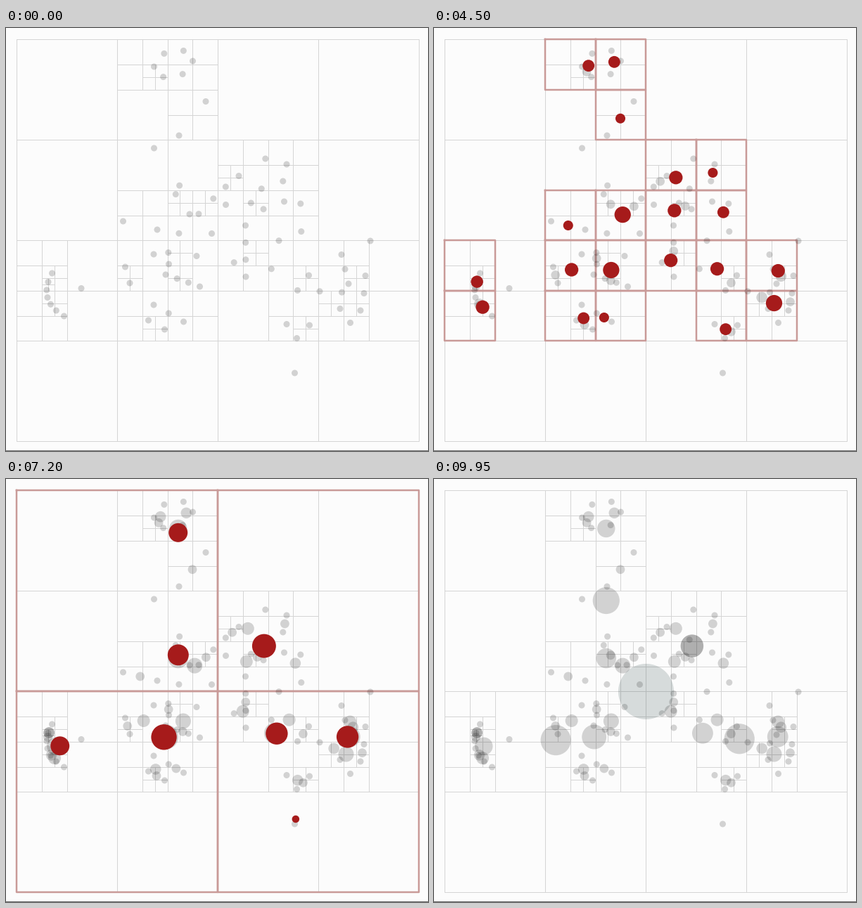
These frames come from a looping animation (600 by 602 pixels, 10000 ms). A matplotlib script:

```python
import math

import matplotlib.pyplot as plt
import numpy as np
from matplotlib.animation import FuncAnimation
from matplotlib.collections import LineCollection

W, H, DPI = 600, 602, 64
STEP, LOOP = 50, 10000
LEFT, TOP, SIZE = 15, 16.4, 572
DOT, RIM = 4.5, 0.75
RED, BOX, GRID, PAPER = "#a61b1b", "#c99a98", "#d5d5d5", "#fcfcfc"
SHADE = 0.165

# One phase per tree level, deepest first (times in ms).
DEEPEST = 5
FIRST, SECOND, PERIOD = 570, 2000, 1559
STARTS = [FIRST] + [SECOND + PERIOD * k for k in range(DEEPEST + 1)]
HOLD, MOVE, GROW = 450, 300, 310


def trail(count, *keys):
    """Dots evenly spaced along the smooth curve through the key points."""
    order = len(keys)
    curve = np.polyfit(np.linspace(0, 1, order), np.array(keys), order - 1)
    return np.vander(np.linspace(0, 1, count), order) @ curve


def ring(count, center, across, down):
    turn = np.linspace(0, 2 * math.pi, count, endpoint=False)[:, None]
    return np.array(center) + np.cos(turn) * across + np.sin(turn) * down


POINTS = np.vstack([
    # top left and centre left
    ring(6, (238, 51), (27.5, -4), (-0.7, 19.2)),
    trail(2, (284, 104.5), (246, 153)),
    trail(4, (210.5, 171), (261.4, 246), (292.5, 292.5)),
    trail(3, (241.3, 236.6), (348.3, 249)),
    trail(3, (261, 265), (230.8, 319.6)),
    trail(2, (166.5, 275), (215, 287)),
    # top right
    trail(3, (368.8, 186), (418.8, 250)),
    trail(3, (331, 210.5), (395.5, 247)),
    trail(3, (312.3, 226), (419.8, 289.6)),
    trail(2, (399, 194), (388, 302.7)),
    trail(4, (340.5, 281), (341, 354)),
    # bottom left
    trail(7, (65.5, 349), (59, 383.5), (82.5, 410)),
    trail(2, (107, 370.5), (176, 363)),
    trail(2, (169.5, 340), (210, 322)),
    trail(2, (231.5, 336), (312.5, 251.5)),
    trail(4, (227, 351), (275.5, 368)),
    trail(3, (210, 394), (252.5, 418)),
    trail(2, (202.5, 416), (225.5, 429)),
    # bottom right
    trail(4, (271, 324.5), (430.5, 352)),
    trail(3, (477, 322.5), (487, 364)),
    trail(3, (518, 303), (504, 402)),
    trail(4, (414.5, 373.4), (509, 377.5)),
    trail(2, (475, 399.5), (489.5, 419.5)),
    trail(2, (399, 421.5), (431.5, 423)),
    trail(2, (413.5, 441.5), (410.5, 491)),
])


def whole(value):
    return math.floor(value + 0.5)


class Cell:
    """Quadtree cell that splits until it holds a single point."""

    def __init__(self, x, y, size, points, depth=0):
        self.x, self.y, self.size, self.depth = x, y, size, depth
        self.center = points.mean(axis=0)
        self.radius = DOT * math.sqrt(len(points))
        self.children = []
        if len(points) < 2:
            return
        half = size / 2
        east = points[:, 0] >= x + half
        south = points[:, 1] >= y + half
        for dx in (0, 1):
            for dy in (0, 1):
                inside = points[(east == dx) & (south == dy)]
                if len(inside):
                    self.children.append(Cell(
                        x + dx * half, y + dy * half, half, inside, depth + 1))

    def inner(self):
        """All cells that were split, this one included."""
        if self.children:
            yield self
            for child in self.children:
                yield from child.inner()

    def ticks(self, shift):
        """Pixel positions of the start, middle and end on both axes."""
        return [[whole(start + self.size * part) + shift for part in (0, 0.5, 1)]
                for start in (self.x, self.y)]

    def outline(self, shift=0.0):
        (x0, _, x1), (y0, _, y1) = self.ticks(shift)
        return [(x0, y0), (x1, y0), (x1, y1), (x0, y1), (x0, y0)]

    def cross(self):
        (x0, xm, x1), (y0, ym, y1) = self.ticks(0.5)
        return [[(xm, y0), (xm, y1)], [(x0, ym), (x1, ym)]]


def cubic_in_out(u):
    u = min(max(u, 0), 1)
    return 4 * u ** 3 if u < 0.5 else 1 - 4 * (1 - u) ** 3


def elastic_out(u):
    if u <= 0:
        return 0
    if u >= 1:
        return 1
    return 1 + 2 ** (-10 * u) * math.sin((u - 0.075) * 2 * math.pi / 0.3)


def px(width):
    return width * 72 / DPI


def areas(radii):
    return px(2 * np.asarray(radii, dtype=float)) ** 2


root = Cell(LEFT, TOP, SIZE, POINTS)
levels = [[c for c in root.inner() if c.depth == d] for d in range(DEEPEST + 1)]

fig = plt.figure(figsize=(W / DPI, H / DPI), dpi=DPI, facecolor=PAPER)
ax = fig.add_axes([0, 0, 1, 1])
ax.axis("off")
ax.set_xlim(0, W)
ax.set_ylim(H, 0)
ax.set_autoscale_on(False)


def add_lines(segments, color, width, z):
    lines = LineCollection(segments, colors=color, linewidths=px(width),
                           zorder=z, capstyle="projecting", snap=False)
    return ax.add_collection(lines, autolim=False)


def add_discs(centers, radii, color, alpha, z):
    centers = np.asarray(centers)
    return ax.scatter(centers[:, 0], centers[:, 1], s=areas(radii), c=color,
                      alpha=alpha, linewidths=0, zorder=z)


grid = [root.outline(0.5)] + [s for c in root.inner() for s in c.cross()]
add_lines(grid, GRID, 1, 1)
add_lines([[(0, 601.5), (W, 601.5)]], "#6e6e6e", 1, 1)
add_discs(POINTS, [DOT] * len(POINTS), "black", SHADE, 3)

boxes = [add_lines([c.outline() for c in cells], BOX, 2.5, 2) for cells in levels]
shadows = [add_discs([c.center for c in cells], [c.radius for c in cells],
                     "black" if depth else "#163434", SHADE, 3)
           for depth, cells in enumerate(levels)]
masses = add_discs([(0, 0)], [0], RED, 1, 4)


def update(frame):
    now = frame * STEP
    phase = sum(now >= s for s in STARTS) - 1
    depth = DEEPEST - phase
    for d in range(DEEPEST + 1):
        boxes[d].set_visible(d == depth)
        shadows[d].set_visible(d > depth)

    active = 0 <= depth <= DEEPEST
    masses.set_visible(active)
    if active:
        elapsed = now - STARTS[phase] - HOLD
        moved = cubic_in_out(elapsed / MOVE)
        grown = max(elastic_out((elapsed - MOVE) / GROW), 0)
        centers, radii = [], []
        for cell in levels[depth]:
            for child in cell.children:
                centers.append(child.center + (cell.center - child.center) * moved)
                radii.append(child.radius + RIM)
            if grown:
                centers.append(cell.center)
                radii.append(cell.radius * grown + RIM)
        masses.set_offsets(centers)
        masses.set_sizes(areas(radii), DPI)
    return [masses, *boxes, *shadows]


anim = FuncAnimation(fig, update, frames=LOOP // STEP, interval=STEP,
                     repeat=True, repeat_delay=0, blit=False)
plt.show()
```
